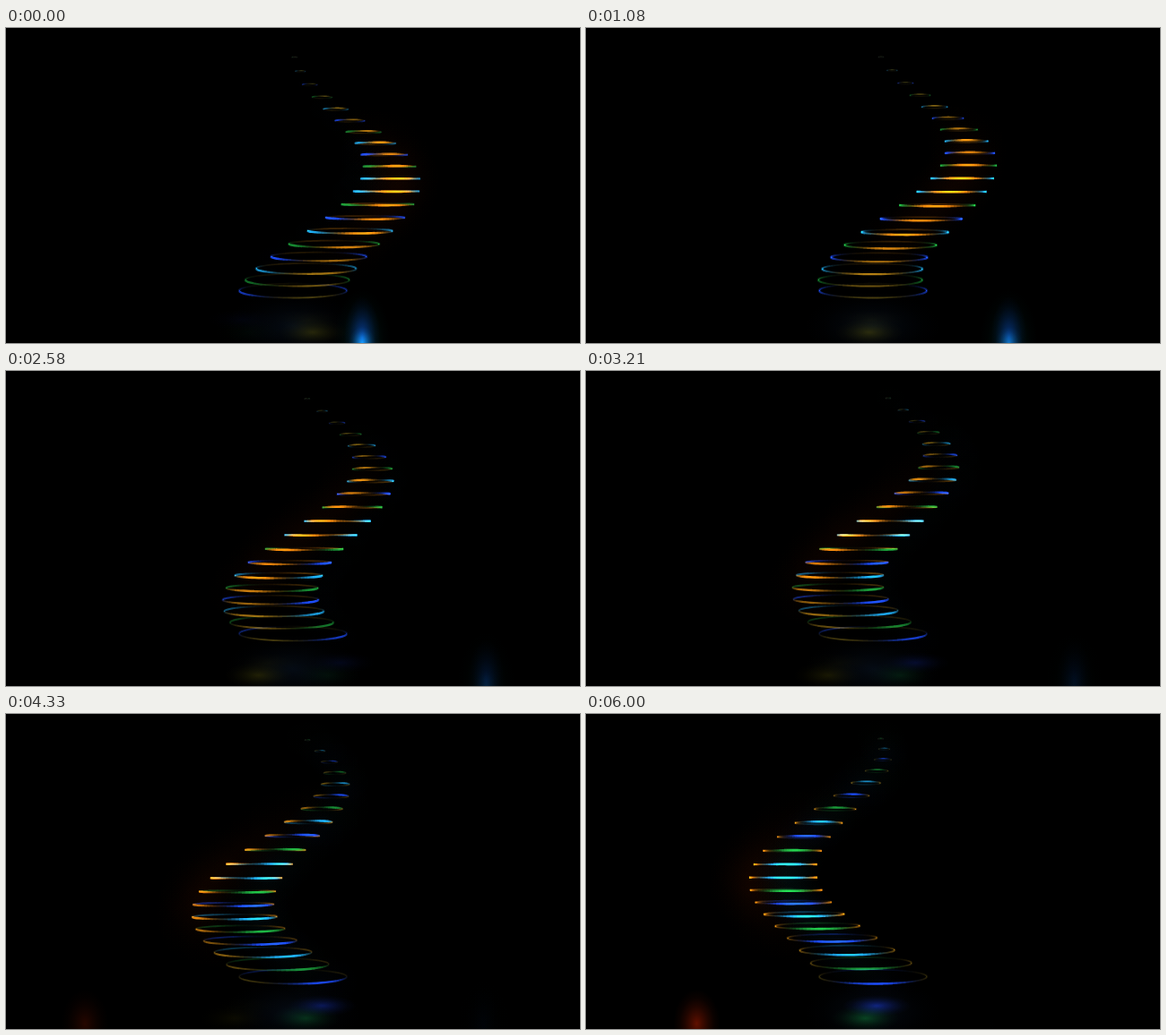
These frames come from a looping animation (640x352 px, 6040 ms). An HTML page with a canvas:

```html
<!DOCTYPE html>
<html lang="en">
<head>
<meta charset="utf-8">
<title>Swaying rings</title>
<style>
html, body { margin: 0; width: 100%; height: 100%; overflow: hidden; background: #000; }
canvas { display: block; width: 640px; height: 352px; }
</style>
</head>
<body>
<canvas id="stage" width="640" height="352"></canvas>
<script>
const ctx = document.getElementById('stage').getContext('2d');
const LOOP = 6040, RINGS = 20, STEPS = 72;
const MID_X = 320, HORIZON = 174, DEPTH = 900, LIGHT_DIST = 400;
const { sin, cos, atan2, exp, abs, min, max, PI } = Math;

// Ring tints repeat outwards from eye level: cyan, green, blue
const TINTS = [[28, 160, 225], [22, 135, 48], [28, 75, 250]];
const WARM_GAIN = [1, .85, .75];

const rgb = c => `rgb(${c.map(v => min(255, v) | 0).join()})`;
const bell = (v, mid, width) => exp(-(((v - mid) / width) ** 2));

function project(x, y, z) {
  const s = DEPTH / (DEPTH - z);
  return [MID_X + x * s, HORIZON + y * s];
}

function blob(x, y, rx, ry, color, alpha) {
  if (alpha <= 0) return;
  const g = ctx.createRadialGradient(0, 0, 0, 0, 0, 1);
  for (let k = 0; k <= 4; k++)
    g.addColorStop(k / 4, `rgba(${color},${alpha * (1 - k / 4) ** 1.6})`);
  ctx.save();
  ctx.translate(x, y);
  ctx.scale(rx, ry);
  ctx.fillStyle = g;
  ctx.fillRect(-1, -1, 2, 2);
  ctx.restore();
}

// Shine lies halfway between viewer and light and repeats every half turn;
// a shine at the far right is reported as the matching one at the left
function shineAngle(x, z, light) {
  const a = atan2(LIGHT_DIST * sin(light) - x, LIGHT_DIST * cos(light) - z) / 2;
  return a > 1.3 ? a - PI : a;
}

function ringAt(i, t) {
  const sway = 109 * sin(PI * i / RINGS);
  const phase = .126 + .1533 * i - .42 * t;
  const x = sway * sin(phase), z = sway * cos(phase);
  const light = .6 - .6 * t;
  return {
    x, z, y: 119 - 13.84 * i, r: 60 * (1 - i / RINGS),
    tint: Math.floor(abs(i - 8.5)) % 3,
    warmth: bell(i, 8, 7.5), chill: bell(i, 7, 10),
    warm: shineAngle(x, z, light),
    cool: shineAngle(x, z, light + PI)
  };
}

function drawRing(ring) {
  const { warmth, chill } = ring, tint = TINTS[ring.tint];
  const point = a => project(ring.x + ring.r * sin(a), ring.y, ring.z + ring.r * cos(a));
  const size = min(1, .5 + ring.r / 50);
  for (let k = 0; k < STEPS; k++) {
    const a = k / STEPS * 2 * PI, mid = a + PI / STEPS;
    const facing = .2 + .8 * ((1 + cos(mid)) / 2) ** 1.2;
    const w = 1.5 * abs(cos(mid - ring.warm)) ** 5 * facing * WARM_GAIN[ring.tint];
    const c = 1.6 * abs(cos(mid - ring.cool)) ** 5 * facing * chill;
    ctx.strokeStyle = rgb([
      230 * w * warmth ** 1.15 + tint[0] * c,
      130 * w * warmth ** .8 + tint[1] * c,
      12 * w + tint[2] * c
    ]);
    ctx.lineWidth = size * (1.5 + 1.1 * min(1, max(w * warmth, c)));
    ctx.beginPath();
    ctx.moveTo(...point(a));
    ctx.lineTo(...point(a + 2 * PI / STEPS));
    ctx.stroke();
  }
}

function drawGlow(ring) {
  const shine = a => project(ring.x + ring.r * sin(a), ring.y, ring.z + ring.r * cos(a));
  blob(...shine(ring.warm), 48, 40, '120,28,0', .07 * ring.warmth ** 4);
  blob(...shine(ring.cool), 42, 32, TINTS[ring.tint], .045 * ring.chill * cos(ring.cool) ** 2);
}

function drawFloor(t) {
  blob(MID_X, 333, 75, 38, '12,28,50', .4);
  for (const i of [0, 1]) {
    const ring = ringAt(i, t), y = 326 + 14 * i;
    const smear = (angle, color, gain) =>
      blob(MID_X + ring.x + ring.r * sin(angle), y, 38, 12 + 3 * i, color,
        gain * max(0, cos(angle)) ** 2);
    smear(ring.cool, i ? '8,85,30' : '18,40,160', .7);
    smear(ring.warm, '65,60,0', i ? .6 : .15);
  }
  const coolX = MID_X + 225 * sin(.35 + .36 * t), fade = bell(t, 0, 2.5);
  blob(coolX, 352, 32, 60, '0,50,45', .7 * fade);
  blob(coolX, 346, 20, 46, '10,45,160', .8 * fade);
  blob(coolX, 352, 15, 18, '20,130,170', .7 * fade * fade);
  const warmX = MID_X - 232 * cos(.35 * (t - 4.4));
  blob(warmX, 346, 26, 38, '120,20,0', min(.8, max(0, (t - 3.4) / 3)));
}

function draw(now) {
  const t = now % LOOP / 1000;
  ctx.globalCompositeOperation = 'source-over';
  ctx.fillStyle = '#000';
  ctx.fillRect(0, 0, 640, 352);
  ctx.globalCompositeOperation = 'lighter';
  drawFloor(t);
  for (let i = 0; i < RINGS; i++) {
    const ring = ringAt(i, t);
    drawGlow(ring);
    drawRing(ring);
  }
}

let start;
function tick(now) {
  start ??= now;
  draw(now - start);
  requestAnimationFrame(tick);
}
draw(0);
requestAnimationFrame(tick);
</script>
</body>
</html>
```
